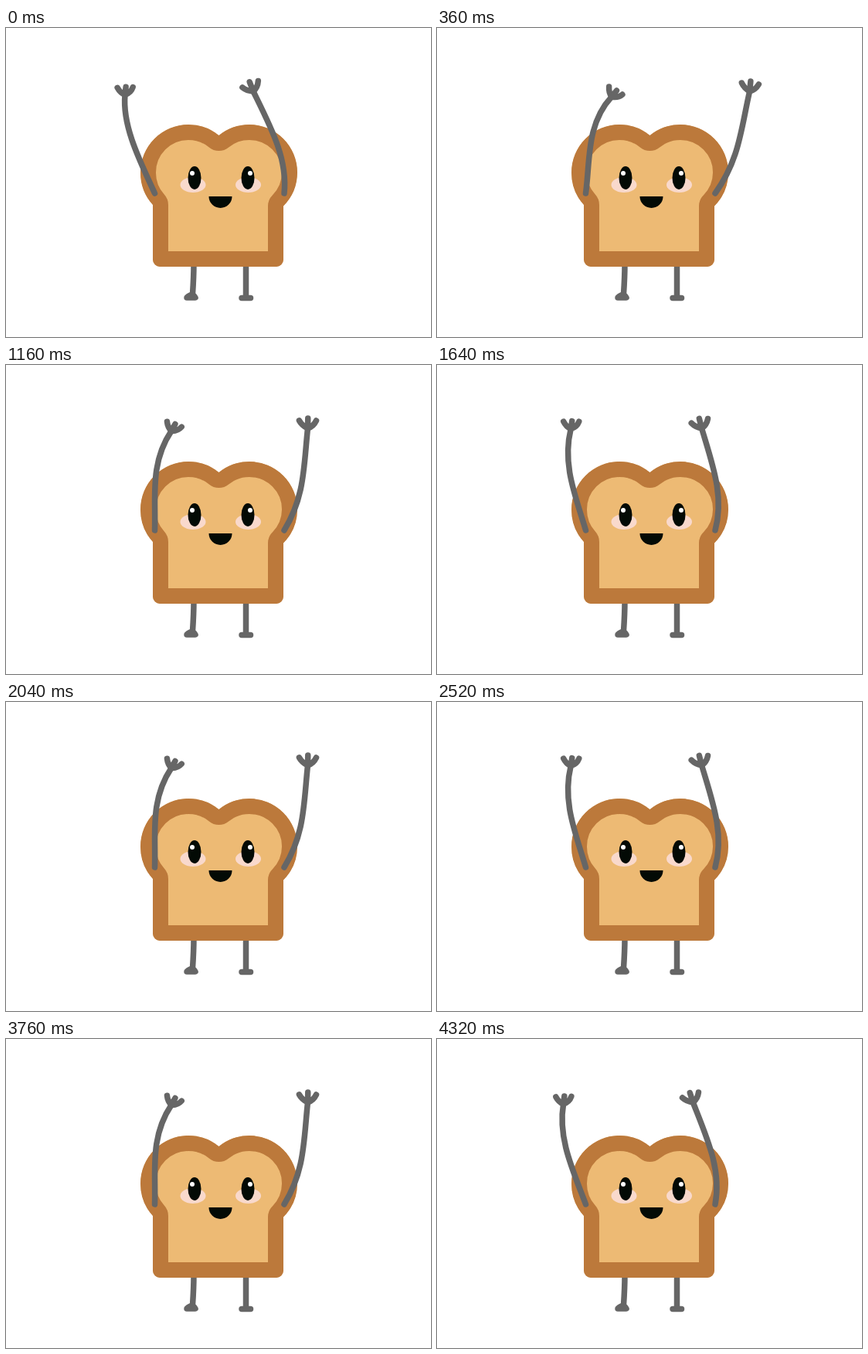
Animation of 550x400 px, one loop 4360 ms. Source, as an HTML page:

```html
<!DOCTYPE html>
<html lang="en">
<head>
<meta charset="utf-8">
<title>Waving toast</title>
<style>
html, body { margin: 0; width: 100%; height: 100%; overflow: hidden; background: #fff; }
svg { display: block; width: 550px; height: 400px; }
.limb { fill: none; stroke: #666; stroke-width: 7.5; stroke-linecap: round; stroke-linejoin: round; }
</style>
</head>
<body>
<svg viewBox="0 0 550 400">
  <defs>
    <path id="slice" d="M275.5 139A62 62 0 0 1 315 125A62 62 0 0 1 377 187A62 62 0 0 1 359 230.5V300A9 9 0 0 1 350 309H199A9 9 0 0 1 190 300V229A62 62 0 0 1 174 187A62 62 0 0 1 236 125A62 62 0 0 1 275.5 139Z"/>
    <clipPath id="edge"><use href="#slice"/></clipPath>
  </defs>

  <g class="limb">
    <path d="M243 305Q243 322 241.5 344"/>
    <path d="M234 349Q241 342 245 349Z" fill="#666"/>
    <path d="M310.5 305V347M305 349.5H316.5"/>
  </g>

  <use href="#slice" clip-path="url(#edge)" fill="#edba74" stroke="#bc793b" stroke-width="40" stroke-linejoin="round"/>

  <g fill="#f9d9cc">
    <ellipse cx="242" cy="203" rx="16.5" ry="10"/>
    <ellipse cx="313.5" cy="203" rx="16.5" ry="10"/>
  </g>
  <g fill="#030a05">
    <ellipse cx="244" cy="194" rx="8.5" ry="15"/>
    <ellipse cx="313" cy="194" rx="8.5" ry="15"/>
    <path d="M262.5 218H292.5A15 15 0 0 1 262.5 218Z"/>
  </g>
  <g fill="#fff">
    <circle cx="241" cy="188" r="3"/>
    <circle cx="316" cy="188" r="3"/>
  </g>

  <g class="limb">
    <path id="leftArm"/>
    <path id="leftHand" d="M0 0Q-6 -3 -9 -10M0 0L2 -10M0 0Q8 -2 11 -9"/>
    <path id="rightArm"/>
    <path id="rightHand" d="M0 0Q-8 -3 -12 -9M0 0L-1 -13M0 0Q7 -3 10 -11"/>
  </g>
</svg>
<script>
const LOOP = 4360, TICK = 40, WAVE = LOOP / 5, HOLD = 59;

const byId = id => document.getElementById(id);

// Control values of a cubic that passes through b and c at thirds.
const controls = (a, b, c, d) => [
  (-5 * a + 18 * b - 9 * c + 2 * d) / 6,
  (2 * a - 9 * b + 18 * c - 5 * d) / 6
];

// The arm runs from the shoulder through two points, low and high, to the wrist.
function drawArm(side, shoulder, low, high, wrist, wristY, angle) {
  const [x1, x2] = controls(shoulder, low, high, wrist);
  const [y1, y2] = controls(214, 171, 128, wristY);
  byId(side + "Arm").setAttribute("d", `M${shoulder} 214C${x1} ${y1} ${x2} ${y2} ${wrist} ${wristY}`);
  byId(side + "Hand").setAttribute("transform", `translate(${wrist} ${wristY}) rotate(${angle})`);
}

// Arms swing right faster than they swing back; 0 is far left, 1 far right.
function swing(time) {
  const pose = Math.round(time % WAVE / HOLD);
  return Math.min(0.15 * pose, 0.12 * (15 - pose), 0.97);
}

function draw() {
  const time = Math.floor(performance.now() % LOOP / TICK) * TICK;
  const s = swing(time);
  drawArm("left", 192.5, 173 + 26 * s, 158 + 51 * s, 154 + 80 * s, 82 + 28 * (s - 0.4) ** 2, 40 * s * s - 5);
  drawArm("right", 360, 357 + 29 * s, 342 + 59 * s, 320 + 94 * s, 82, 30 * s - 17);
  requestAnimationFrame(draw);
}
draw();
</script>
</body>
</html>
```
